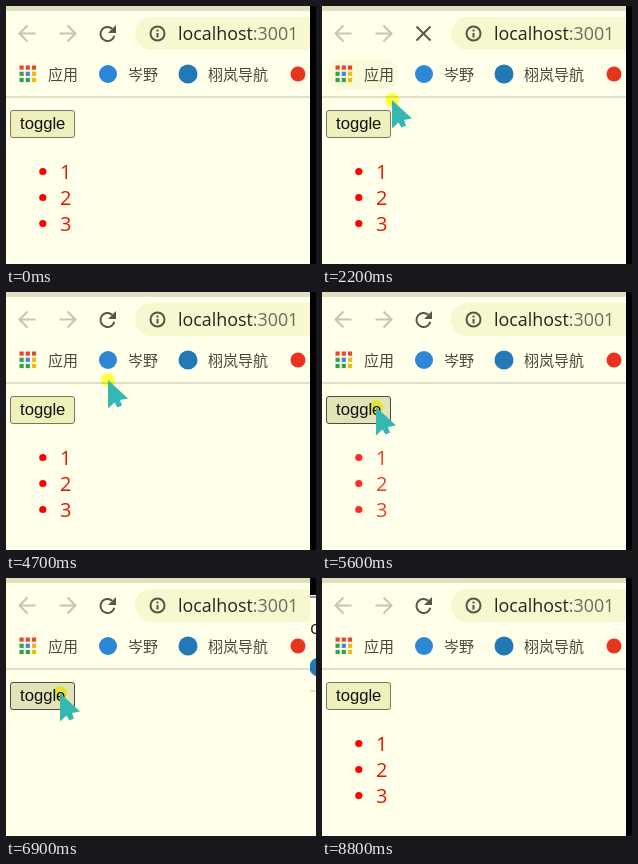
These frames come from a looping animation (310 by 258 pixels, 8.9 s). An HTML page with a canvas:

```html
<!DOCTYPE html>
<html lang="zh">
<head>
<meta charset="utf-8">
<title>toggle</title>
<style>
  html, body { margin: 0; width: 100%; height: 100%; overflow: hidden; background: #ffffea; }
  canvas { display: block; }
</style>
</head>
<body>
<canvas id="stage" width="310" height="258"></canvas>
<script>
const ctx = document.getElementById('stage').getContext('2d');
const LOOP = 8900, STEP = 100;
const PAPER = '#ffffea', INK = '#55554a', RULE = '#dfdfc3';
const LATIN = '"Open Sans", sans-serif';
const CJK = '"Noto Sans CJK SC", "Noto Sans CJK", sans-serif';

// Pointer keys: time, x, y
const route = [
  [500, 150, -20], [1200, 102, 28], [1500, 102, 28], [2200, 70, 94],
  [2400, 70, 94], [3200, 102, 88], [5000, 102, 88], [5500, 54, 115],
  [8300, 54, 115], [8800, -24, 130]
];

const clamp = v => Math.max(0, Math.min(1, v));
const ease = v => v * v * (3 - 2 * v);
const within = (t, from, to) => t >= from && t < to;

function pointerAt(t) {
  if (t < route[0][0] || t >= route[route.length - 1][0]) return null;
  const i = route.findIndex(key => key[0] > t);
  const [t0, x0, y0] = route[i - 1], [t1, x1, y1] = route[i];
  const k = ease((t - t0) / (t1 - t0));
  return { x: x0 + (x1 - x0) * k, y: y0 + (y1 - y0) * k };
}

function listAlpha(t) {
  return t < 7200 ? 1 - clamp((t - 5500) / 600) : clamp((t - 7200) / 600);
}

function rect(x, y, w, h, color) {
  ctx.fillStyle = color;
  ctx.fillRect(x, y, w, h);
}

function disc(x, y, r, color) {
  ctx.fillStyle = color;
  ctx.beginPath();
  ctx.arc(x, y, r, 0, 7);
  ctx.fill();
}

function arc(x, y, r, from, to, color) {
  ctx.strokeStyle = color;
  ctx.lineWidth = 2;
  ctx.beginPath();
  ctx.arc(x, y, r, from, to);
  ctx.stroke();
}

function polygon(color, ...points) {
  ctx.fillStyle = color;
  ctx.beginPath();
  points.forEach(([x, y]) => ctx.lineTo(x, y));
  ctx.fill();
}

function pill(x, y, w, h, r, color, border) {
  ctx.beginPath();
  ctx.roundRect(x, y, w, h, r);
  ctx.fillStyle = color;
  ctx.fill();
  if (border) {
    ctx.strokeStyle = border;
    ctx.lineWidth = 1;
    ctx.stroke();
  }
}

function line(color, width, ...points) {
  ctx.strokeStyle = color;
  ctx.lineWidth = width;
  ctx.beginPath();
  points.forEach(([x, y]) => ctx.lineTo(x, y));
  ctx.stroke();
}

function text(str, x, y, size, family, color) {
  ctx.font = `${size}px ${family}`;
  ctx.fillStyle = color;
  ctx.fillText(str, x, y);
}

function arrow(x, dir) {
  const tip = x + 8 * dir, color = '#c6c6ab';
  line(color, 2, [x - 8 * dir, 27.5], [tip, 27.5]);
  line(color, 2, [tip - 8 * dir, 19.5], [tip, 27.5], [tip - 8 * dir, 35.5]);
}

function reloadIcon() {
  arc(101.5, 28, 7, 0.25, 5.45, INK);
  polygon(INK, [110, 19], [110, 27], [102, 27]);
}

function stopIcon() {
  line(INK, 2, [94.5, 20.5], [108.5, 34.5]);
  line(INK, 2, [108.5, 20.5], [94.5, 34.5]);
}

function toolbar(loading) {
  rect(0, 0, 304, 5, '#e0e0c0');
  arrow(21.5, -1);
  arrow(61.5, 1);
  loading ? stopIcon() : reloadIcon();

  pill(129, 11, 190, 33, 16.5, '#f7f7d0');
  arc(151.5, 27.5, 7, 0, 7, INK);
  rect(150.5, 23.5, 2, 2, INK);
  rect(150.5, 27, 2, 4.5, INK);
  text('localhost', 172, 34, 17.85, LATIN, '#25251f');
  const hostWidth = ctx.measureText('localhost').width;
  text(':3001', 172 + hostWidth, 34, 17.85, LATIN, '#6c6c5c');
}

function bookmarks(hovered) {
  if (hovered) pill(5, 54, 72, 29, 14, '#fafad8');
  const [r, g, b, y] = ['#e8452f', '#35a150', '#3f82e0', '#f2b90f'];
  [r, r, r, g, b, y, g, g, y].forEach((color, i) =>
    rect(13.5 + (i % 3) * 6.2, 59.5 + Math.floor(i / 3) * 6.2, 4.2, 4.2, color));
  disc(102, 68, 9, '#2d86d6');
  disc(182, 68, 9.5, '#2179b5');
  disc(292, 68, 7.5, '#e8331f');
  text('应用', 42, 74, 15, CJK, '#494940');
  text('岑野', 122, 74, 15, CJK, '#494940');
  text('栩岚导航', 202, 74, 15, CJK, '#494940');
  rect(0, 90, 304, 2, RULE);
}

function page(t, hovered) {
  pill(4.5, 104.5, 64, 27, 2.5, hovered ? '#e2e3b8' : '#f0f0bc', hovered ? '#4c4c40' : '#777762');
  text('toggle', 14, 123, 16.67, '"Liberation Sans", Arial, sans-serif', '#111');
  ctx.globalAlpha = listAlpha(t);
  for (let i = 0; i < 3; i++) {
    disc(36.8, 165.5 + i * 26, 3.6, '#f00');
    text(String(i + 1), 54, 173 + i * 26, 20, LATIN, '#e81800');
  }
  ctx.globalAlpha = 1;
}

// The strip at the right is black; a window behind it flickers through.
function sideStrip(peek) {
  rect(304, 0, 6, 258, '#000');
  if (!peek) return;
  ctx.save();
  ctx.beginPath();
  ctx.rect(304, 17, 6, 241);
  ctx.clip();
  rect(304, 17, 6, 241, PAPER);
  rect(304, 18, 6, 2, '#8f8fc8');
  text('c', 304, 56, 18, LATIN, '#25251f');
  disc(313, 89, 9.5, '#2179b5');
  rect(304, 112, 6, 2, RULE);
  ctx.restore();
}

function pointer({ x, y }) {
  ctx.save();
  ctx.translate(x, y);
  ctx.globalCompositeOperation = 'multiply';
  disc(0, 0, 7, '#ffff4a');
  ctx.globalCompositeOperation = 'source-over';
  polygon('#35b8b2', [0, 0], [0, 28.5], [6.5, 22.5], [9.5, 27.5], [14, 25.5], [12, 20], [20, 18.5]);
  ctx.restore();
}

function draw(t) {
  const p = pointerAt(t);
  const over = (x, y, w, h) => !!p && p.x >= x && p.x <= x + w && p.y >= y && p.y <= y + h;
  rect(0, 0, 310, 258, PAPER);
  toolbar(within(t, 1400, 4300));
  bookmarks(over(5, 54, 72, 41));
  // The page is blank for a moment while it reloads.
  if (!within(t, 4100, 4300)) page(t, over(4, 104, 65, 28));
  sideStrip(t >= 500 && t % 400 === 100);
  if (p) pointer(p);
}

function tick() {
  const t = performance.now() % LOOP;
  draw(Math.floor(t / STEP) * STEP);
  requestAnimationFrame(tick);
}
tick();
</script>
</body>
</html>
```
